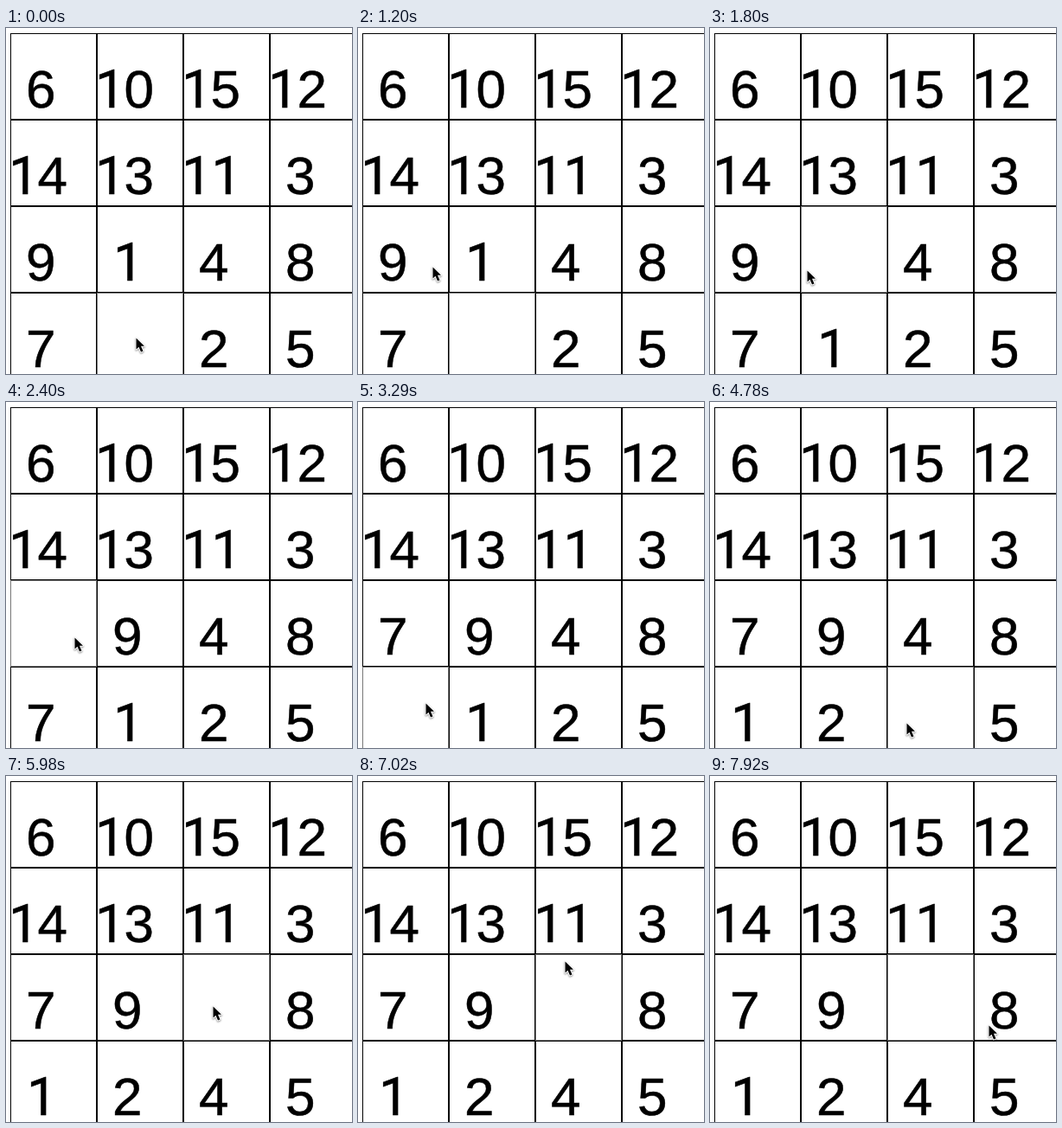
Write an HTML page with a canvas that moves like this. It is 400 px wide and 400 px high and loops after 8 s.

```html
<!DOCTYPE html>
<html lang="en">
<head>
<meta charset="utf-8">
<title>Sliding puzzle</title>
<style>
  html, body { margin: 0; width: 100%; height: 100%; overflow: hidden; background: #fff; }
  canvas { display: block; }
</style>
</head>
<body>
<canvas id="stage" width="400" height="400"></canvas>
<script>
const ctx = document.getElementById('stage').getContext('2d');
const LOOP = 8000, TICK = 150, CELL = 100, LEFT = 5, TOP = 6, SIZE = 62;
const START = [6, 10, 15, 12, 14, 13, 11, 3, 9, 1, 4, 8, 7, 0, 2, 5];

// The pointer glides between a few resting points
const glide = (time, steps, x, y) => ({ time, steps, x, y });
const route = [
  glide(0, 1, 150, 358), glide(600, 5, 86, 276), glide(1350, 2, 112, 280),
  glide(1950, 2, 79, 272), glide(2690, 2, 78, 348), glide(3440, 3, 145, 352),
  glide(4190, 3, 227, 371), glide(5230, 3, 239, 266), glide(6280, 2, 231, 185),
  glide(7020, 4, 283, 371), glide(7770, 2, 322, 288)
];
const clicks = [1800, 2400, 3290, 4040, 4780, 5980];

const arrow = new Path2D('M.5 .5V13.5L3.5 10.7L6 16.5L8.5 15.4L6 9.8H10Z');
const ease = p => p * p * (3 - 2 * p);

function pointerAt(t) {
  let x = 0, y = 0;
  for (const stop of route.filter(s => s.time <= t)) {
    const done = Math.min(stop.steps, Math.floor((t - stop.time) / TICK) + 1);
    const p = ease(done / stop.steps);
    x += (stop.x - x) * p;
    y += (stop.y - y) * p;
  }
  return [Math.round(x), Math.round(y)];
}

// Each click moves the tile under the pointer into the empty cell
function boardAt(t) {
  const board = [...START];
  for (const time of clicks.filter(c => c <= t)) {
    const [x, y] = pointerAt(time);
    const cell = Math.floor((y - TOP) / CELL) * 4 + Math.floor((x - LEFT) / CELL);
    board[board.indexOf(0)] = board[cell];
    board[cell] = 0;
  }
  return board;
}

// The plain "1" without a foot comes from a second font
function drawNumber(value, x, y) {
  [...String(value)].forEach((digit, i) => {
    const one = digit === '1';
    ctx.font = `${SIZE}px ${one ? 'Roboto' : '"Liberation Sans"'}, Arial, sans-serif`;
    const left = x + i * SIZE * 0.556 + (one ? 1 : 0);
    ctx.fillText(digit, left, y);
    ctx.lineWidth = 0.5;
    ctx.strokeText(digit, left, y);
  });
}

function drawTile(value, cell) {
  const x = LEFT + cell % 4 * CELL;
  const y = TOP + Math.floor(cell / 4) * CELL;
  ctx.lineWidth = 1;
  ctx.strokeStyle = value ? '#000' : '#777';
  ctx.strokeRect(x + 0.5, y + 0.5, CELL - 1, CELL - 1);
  if (value) drawNumber(value, x + (value < 10 ? 18 : -3), y + 86);
}

function drawPointer(x, y) {
  ctx.save();
  ctx.translate(x, y);
  ctx.lineJoin = 'round';
  ctx.lineWidth = 2;
  ctx.strokeStyle = '#fff';
  ctx.shadowColor = 'rgba(0,0,0,.45)';
  ctx.shadowBlur = 2;
  ctx.shadowOffsetY = 1;
  ctx.stroke(arrow);
  ctx.shadowColor = 'transparent';
  ctx.fill(arrow);
  ctx.restore();
}

function draw() {
  const t = performance.now() % LOOP;
  ctx.fillStyle = '#fff';
  ctx.fillRect(0, 0, 400, 400);
  ctx.fillStyle = '#000';
  boardAt(t).forEach(drawTile);
  drawPointer(...pointerAt(t));
  requestAnimationFrame(draw);
}
draw();
</script>
</body>
</html>
```
